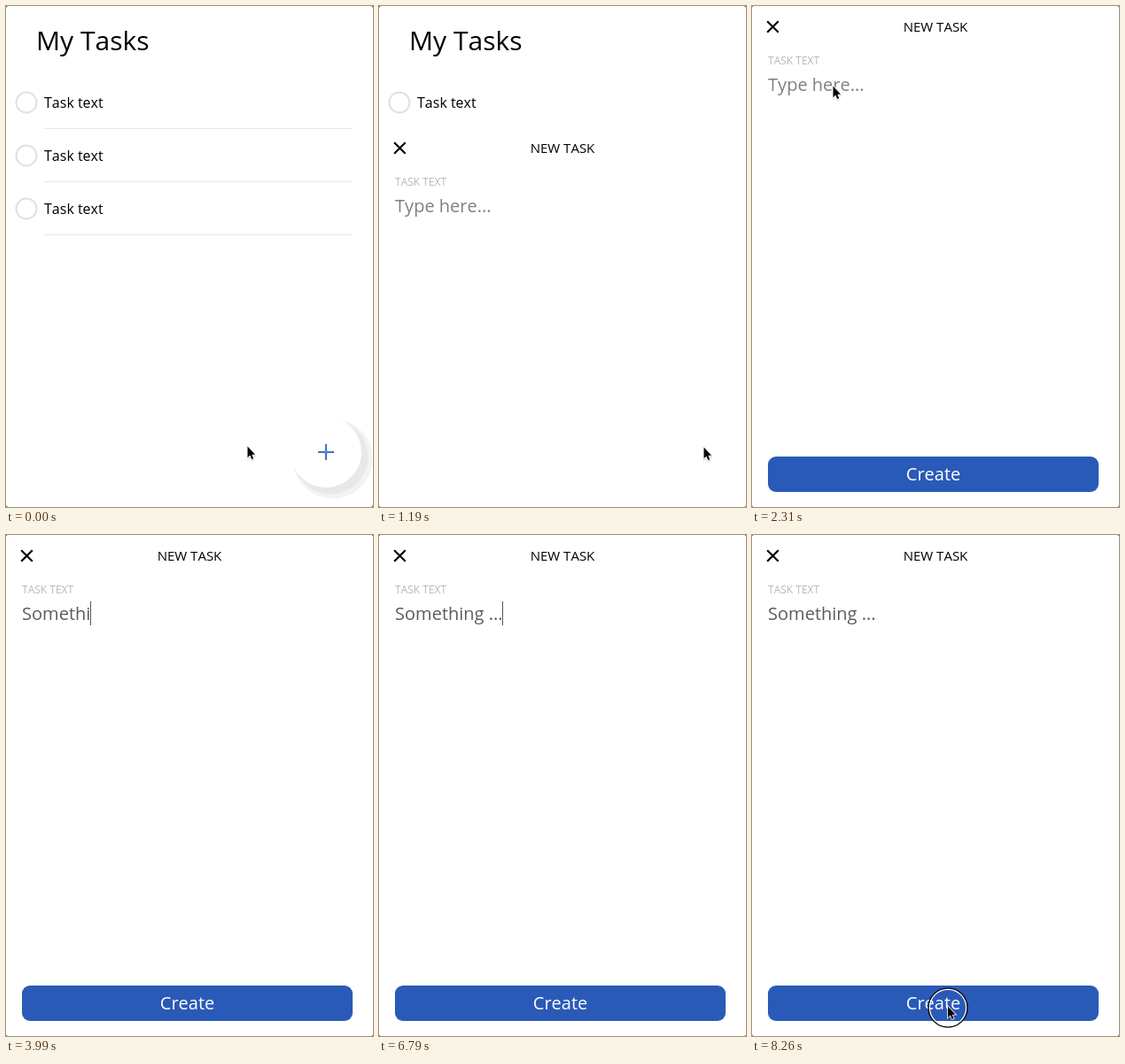
An HTML page that plays this animation: 414x566 px, repeating every 8.4 s.

```html
<!DOCTYPE html>
<html lang="en">
<head>
<meta charset="utf-8">
<title>Task list</title>
<style>
  html, body { margin: 0; width: 100%; height: 100%; overflow: hidden; background: #555; }
  svg { display: block; width: 414px; height: 566px; }
  text { font-family: "Open Sans", sans-serif; font-kerning: none; white-space: pre; }
</style>
</head>
<body>
<svg viewBox="0 0 414 566">
  <defs>
    <clipPath id="window"><rect width="414" height="566" rx="3"/></clipPath>
    <g id="task">
      <circle cx="23" cy="109" r="11.5" fill="#fff" stroke="#e0e0e0" stroke-width="2"/>
      <text x="43" y="115" font-size="16">Task text</text>
      <path d="M43 138.5H391" stroke="#e6e6e6"/>
    </g>
    <path id="arrow" d="M0.5 0.5V13.2L3.3 10.5L5.2 15L7.2 14.2L5.3 9.8H9Z"/>
  </defs>
  <g clip-path="url(#window)">
    <rect width="414" height="566" fill="#fff"/>
    <text x="34" y="50" font-size="30">My Tasks</text>
    <use href="#task"/>
    <use href="#task" y="60"/>
    <use href="#task" y="120"/>
    <circle cx="368.5" cy="511.5" r="45" fill="#f3f3f3"/>
    <circle cx="366.5" cy="509.5" r="42" fill="#e8e8e8"/>
    <circle cx="361" cy="504" r="40" fill="#fff"/>
    <path d="M352 504H370M361 495V513" stroke="#3b73bf" stroke-width="2"/>
    <path d="M361 501L364 504L361 507L358 504Z" fill="#4d86cc"/>

    <g id="panel">
      <rect width="414" height="566" fill="#fff"/>
      <path d="M17.2 17.2L29.8 29.8M29.8 17.2L17.2 29.8" stroke="#000" stroke-width="2.2"/>
      <text x="207" y="29" font-size="15" text-anchor="middle">NEW TASK</text>
      <text x="18" y="66" font-size="12" fill="#b8b8b8">TASK TEXT</text>
      <text id="entry" x="18" y="96" font-size="20"></text>
      <path id="caret" d="M0.5 75V102" stroke="#555"/>
      <rect x="18" y="509" width="373" height="40" rx="9" fill="#2a5ab8"/>
      <text x="204.5" y="536" font-size="20" fill="#fff" text-anchor="middle">Create</text>
    </g>

    <g id="cursor">
      <g id="ring" fill="none">
        <circle cx="0.5" cy="2" r="22" stroke="#111" stroke-width="1.6"/>
        <circle cx="0.5" cy="2" r="20.6" stroke="#fff" stroke-width="1.2"/>
      </g>
      <use href="#arrow" y="1.5" stroke="#000" stroke-width="1.5" opacity="0.15"/>
      <use href="#arrow" stroke="#fff" paint-order="stroke" stroke-width="1.6"/>
    </g>
  </g>
</svg>
<script>
const LOOP = 8400, STEP = 70;
const PHRASE = "Something ...";
const keyTimes = [3010, 3150, 3290, 3360, 3710, 3850, 3990, 4130, 4270, 4410, 5460, 5600, 5740];
const caretShown = [[3010, 4900], [5460, 6230], [6790, 7280], [7770, 8190]];
const clicks = [[840, 910], [2450, 2520], [8260, LOOP]];
const cursorPath = [
  [0, 272, 497], [420, 366, 498], [1610, 366, 498], [2170, 89, 92], [2310, 91, 90],
  [7060, 91, 90], [7420, 191, 560], [7840, 220.5, 532]
];

const el = id => document.getElementById(id);
const [panel, entry, caret, cursor, ring] = ["panel", "entry", "caret", "cursor", "ring"].map(el);
const pen = document.createElement("canvas").getContext("2d");

const ease = p => 0.5 - 0.5 * Math.cos(Math.PI * Math.min(1, Math.max(0, p)));
const within = (spans, t) => spans.some(([from, to]) => t >= from && t < to);
const show = (node, on) => node.setAttribute("visibility", on ? "inherit" : "hidden");
const move = (node, x, y) => node.setAttribute("transform", `translate(${x} ${y})`);

function cursorAt(t) {
  const next = cursorPath.findIndex(key => key[0] > t);
  if (next < 0) return cursorPath[cursorPath.length - 1].slice(1);
  const [t0, x0, y0] = cursorPath[next - 1], [t1, x1, y1] = cursorPath[next];
  const p = ease((t - t0) / (t1 - t0));
  return [x0 + (x1 - x0) * p, y0 + (y1 - y0) * p];
}

function render(t) {
  move(panel, 0, Math.round(566 * (1 - ease((t - 902) / 428))));

  const typed = PHRASE.slice(0, keyTimes.filter(k => k <= t).length);
  entry.textContent = typed || "Type here...";
  entry.setAttribute("fill", typed ? "#5c5c5c" : "#808080");
  pen.font = '20px "Open Sans", sans-serif';
  pen.fontKerning = "none";
  move(caret, Math.floor(18 + pen.measureText(typed).width), 0);
  show(caret, within(caretShown, t));

  move(cursor, ...cursorAt(t));
  show(cursor, t < 3010 || t >= 7070);
  show(ring, within(clicks, t));
}

const start = performance.now();
function tick() {
  const t = (performance.now() - start) % LOOP;
  render(Math.floor(t / STEP) * STEP);
  requestAnimationFrame(tick);
}
tick();
</script>
</body>
</html>
```
